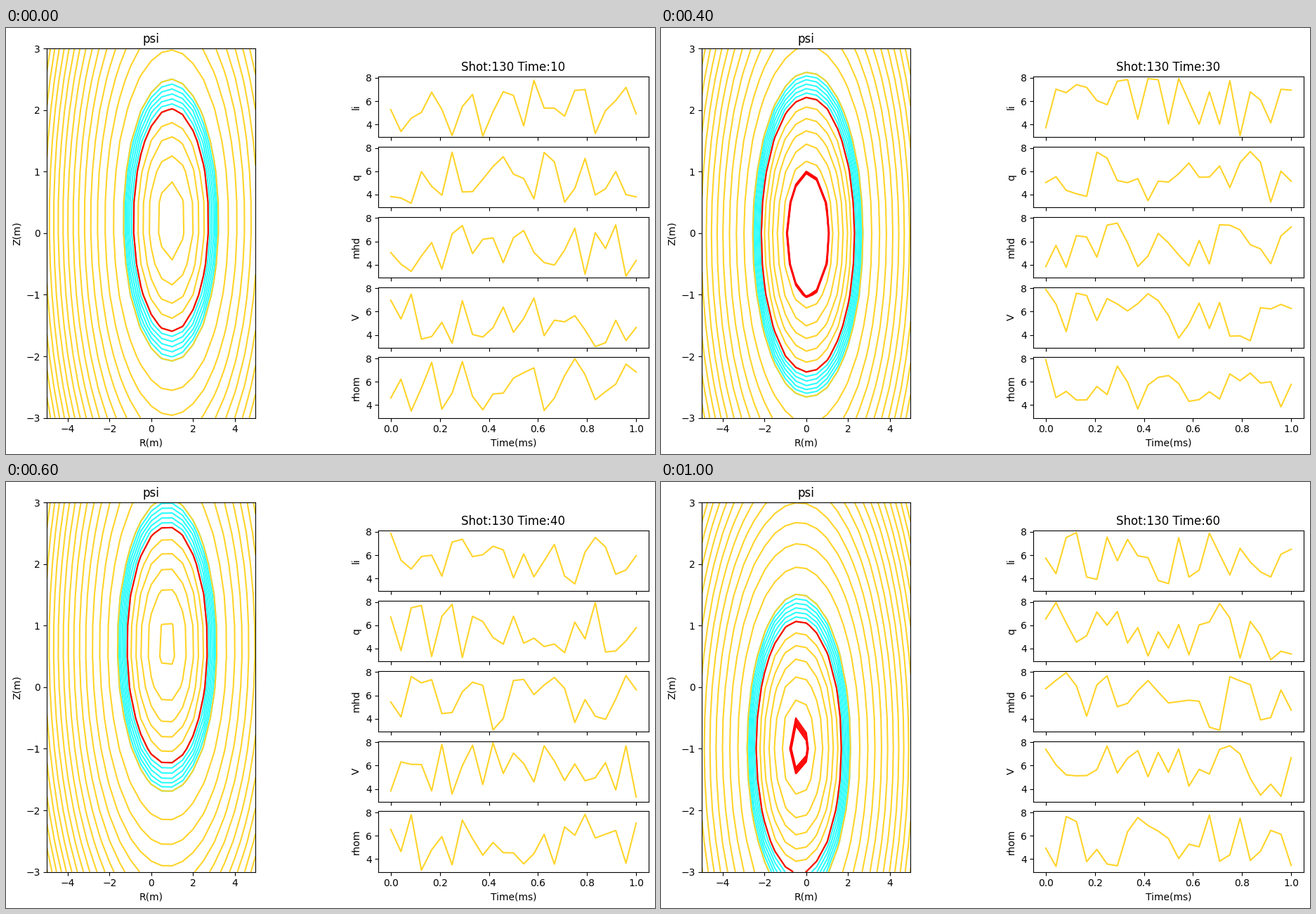
Animation of 924x606 px, one loop 1.2 s. Source, as a matplotlib script:

```python
import numpy as np
import matplotlib.pyplot as plt
from matplotlib.animation import FuncAnimation

W, H = 924, 606
YELLOW, CYAN, RED = "#ffd42a", "#2affff", "#ff0000"
SIGNALS = ["li", "q", "mhd", "V", "rhom"]

# Magnetic axis (R, Z) and the squared radius of the plasma edge per time slice
SLICES = [
    (0.946, 0.210, 3.29),
    (-0.957, -0.435, 3.09),
    (0.080, -0.025, 5.04),
    (0.766, 0.680, 3.75),
    (0.767, 0.970, 3.24),
    (-0.358, -0.975, 4.22),
]

# Flux levels, measured from the plasma edge at zero
SOL_WIDTH = 1.97
CORE = -0.711 * np.arange(5, -1, -1)
OUTER = SOL_WIDTH + 2.4 * np.arange(20)
SOL = np.linspace(0, SOL_WIDTH, 7)
EDGES = np.append(np.linspace(-4.03, -3.975, 4), 0)

R, Z = np.meshgrid(np.linspace(-5, 5, 21), np.linspace(-3, 3, 13))
TIME = np.linspace(0, 1, 25)

fig = plt.figure(figsize=(W / 100, H / 100), dpi=100, facecolor="white")


def add_axes(left, top, width, height):
    """Add axes placed in pixels from the top-left corner."""
    return fig.add_axes([left / W, 1 - (top + height) / H, width / W, height / H])


flux_ax = add_axes(58.3, 29.2, 297, 525.4)
flux_ax.set(title="psi", xlabel="R(m)", ylabel="Z(m)", xlim=(-5, 5), ylim=(-3, 3))

signal_axes, lines = [], []
for row, name in enumerate(SIGNALS):
    ax = add_axes(530.3, 69.2 + 99.8 * row, 384.4, 86.2)
    ax.set(xlim=(-0.05, 1.05), ylim=(2.9, 8.1), yticks=[4, 6, 8], ylabel=name)
    ax.tick_params(labelbottom=row == len(SIGNALS) - 1)
    lines += ax.plot(TIME, np.full_like(TIME, np.nan), color=YELLOW)
    signal_axes.append(ax)
signal_axes[-1].set_xlabel("Time(ms)")
title = signal_axes[0].set_title("")

contours = []


def update(frame):
    while contours:
        contours.pop().remove()
    r0, z0, edge = SLICES[frame]
    psi = (R - r0) ** 2 + (Z - z0) ** 2 - edge
    for levels, color in ((SOL, CYAN), (np.append(CORE, OUTER), YELLOW), (EDGES, RED)):
        contours.append(flux_ax.contour(R, Z, psi, levels=levels, colors=color,
                                        linewidths=1.5, linestyles="solid"))
    flux_ax.set(xlim=(-5, 5), ylim=(-3, 3))

    rng = np.random.default_rng(130 + frame)
    for line in lines:
        line.set_ydata(rng.uniform(3, 8, TIME.size))
    title.set_text(f"Shot:130 Time:{10 * (frame + 1)}")
    return lines


anim = FuncAnimation(fig, update, frames=len(SLICES), init_func=lambda: lines,
                     interval=200, repeat=True, repeat_delay=0, blit=False)
plt.show()
```
